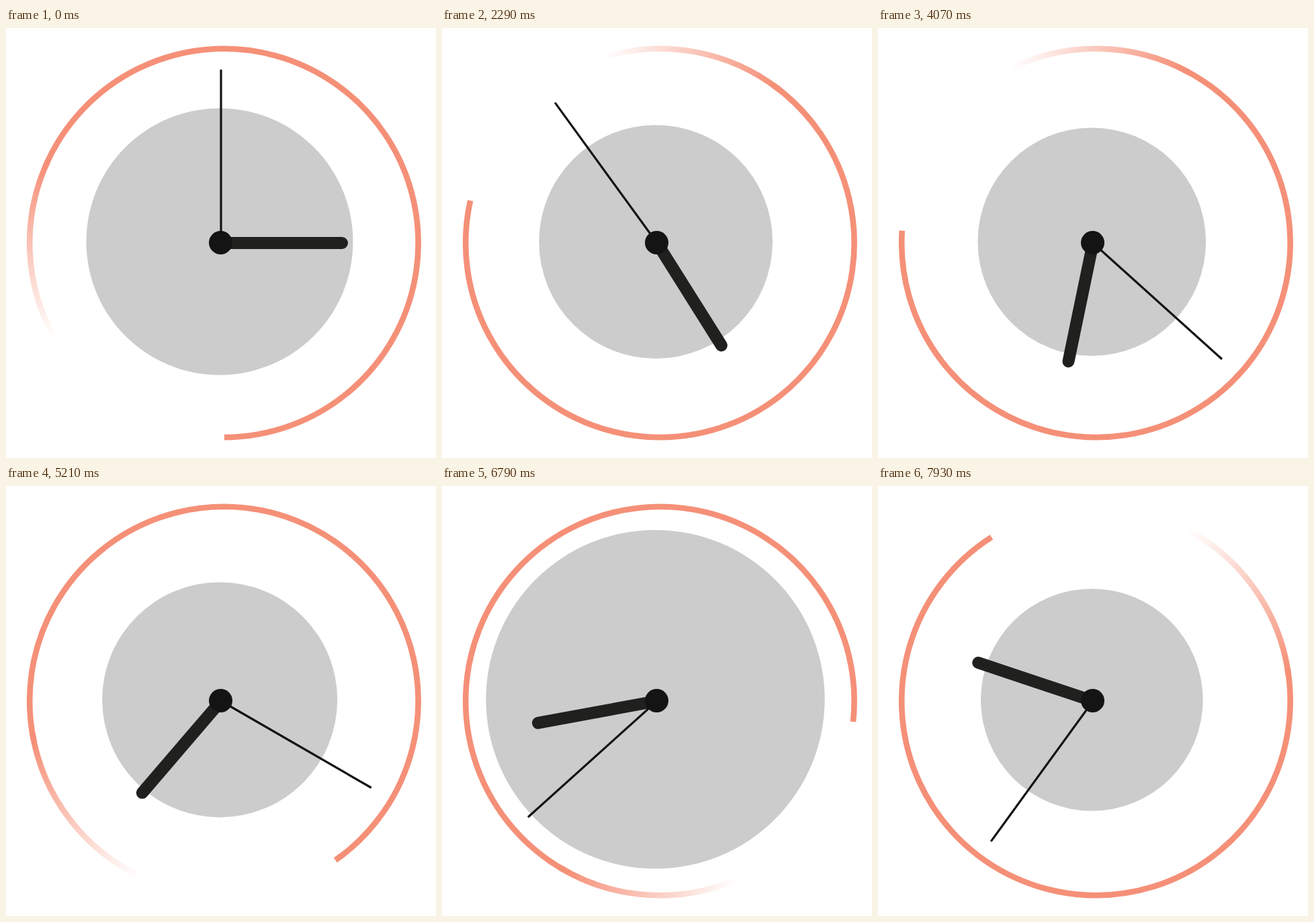
An HTML page for the animation above (8 s loop, 640 px wide and 640 px high).

```html
<!DOCTYPE html>
<html lang="en">
<head>
<meta charset="utf-8">
<title>Clock</title>
<style>
  html, body { margin: 0; width: 100%; height: 100%; overflow: hidden; background: #fff; }
  svg { display: block; width: 100%; height: 100%; }
</style>
</head>
<body>
<svg viewBox="0 0 640 640">
  <defs>
    <linearGradient id="fade" gradientUnits="userSpaceOnUse" x1="0" y1="142" x2="0" y2="-113">
      <stop offset="0" stop-color="#f59078" stop-opacity="0"/>
      <stop offset="1" stop-color="#f59078"/>
    </linearGradient>
  </defs>
  <g id="ring" fill="none" stroke-width="8.6">
    <path id="tail" stroke="url(#fade)"/>
    <path id="arc" stroke="#f59078"/>
  </g>
  <circle id="pulse" fill="#ccc"/>
  <path id="hour" d="M320 320H500" stroke="#20211f" stroke-width="18" stroke-linecap="round"/>
  <path id="second" d="M320 320V63" stroke="#141414" stroke-width="3.2" stroke-linecap="round"/>
  <circle cx="319.5" cy="319.5" r="17.5" fill="#141414"/>
</svg>
<script>
const LOOP = 8000;   // ms
const SHOWN = 14;    // pictures per second
const RATE = 25;     // clock steps per second
const TURN = 361;    // steps for one round of the hour hand
const BEAT = TURN / 30;
const RADIUS = 289.2;

// Radius of the grey disc over one beat: [step, radius]
const BEAT_KEYS = [
  [0, 198.5], [1.57, 253.4], [2.4, 256], [4, 215], [5.73, 169.8],
  [6.47, 165.3], [6.93, 166.4], [9.87, 173.8], [10.67, 175], [BEAT, 198.5]
];

const el = id => document.getElementById(id);
const ring = el('ring'), pulse = el('pulse'), hour = el('hour'), second = el('second');

function point(deg) {
  const a = deg * Math.PI / 180;
  return `${(RADIUS * Math.cos(a)).toFixed(2)} ${(RADIUS * Math.sin(a)).toFixed(2)}`;
}

function arcPath(from, to) {
  const large = to - from > 180 ? 1 : 0;
  return `M${point(from)}A${RADIUS} ${RADIUS} 0 ${large} 1 ${point(to)}`;
}

function sample(keys, x) {
  const i = Math.max(1, keys.findIndex(k => k[0] >= x));
  const [x0, y0] = keys[i - 1], [x1, y1] = keys[i];
  return y0 + (y1 - y0) * (x - x0) / (x1 - x0);
}

function rotate(node, deg) {
  node.setAttribute('transform', `rotate(${deg} 320 320)`);
}

function draw(ms) {
  const tick = Math.floor(ms / 10) * 10 + 5;
  const shown = Math.floor(tick * SHOWN / 1000);
  const step = Math.ceil(shown * RATE / SHOWN);

  ring.setAttribute('transform', `translate(324.4 320) rotate(${step * 8 * 360 / TURN})`);
  rotate(hour, step * 360 / TURN);
  rotate(second, Math.max(0, step - 1) * 12 % 360);

  const r = sample(BEAT_KEYS, step % BEAT);
  const c = 319.7 - r * 0.0087;
  pulse.setAttribute('r', r);
  pulse.setAttribute('cx', c);
  pulse.setAttribute('cy', c);
}

el('tail').setAttribute('d', arcPath(150.5, 205));
el('arc').setAttribute('d', arcPath(203, 449.9));

const start = performance.now();
function loop() {
  draw((performance.now() - start) % LOOP);
  requestAnimationFrame(loop);
}
loop();
</script>
</body>
</html>
```
